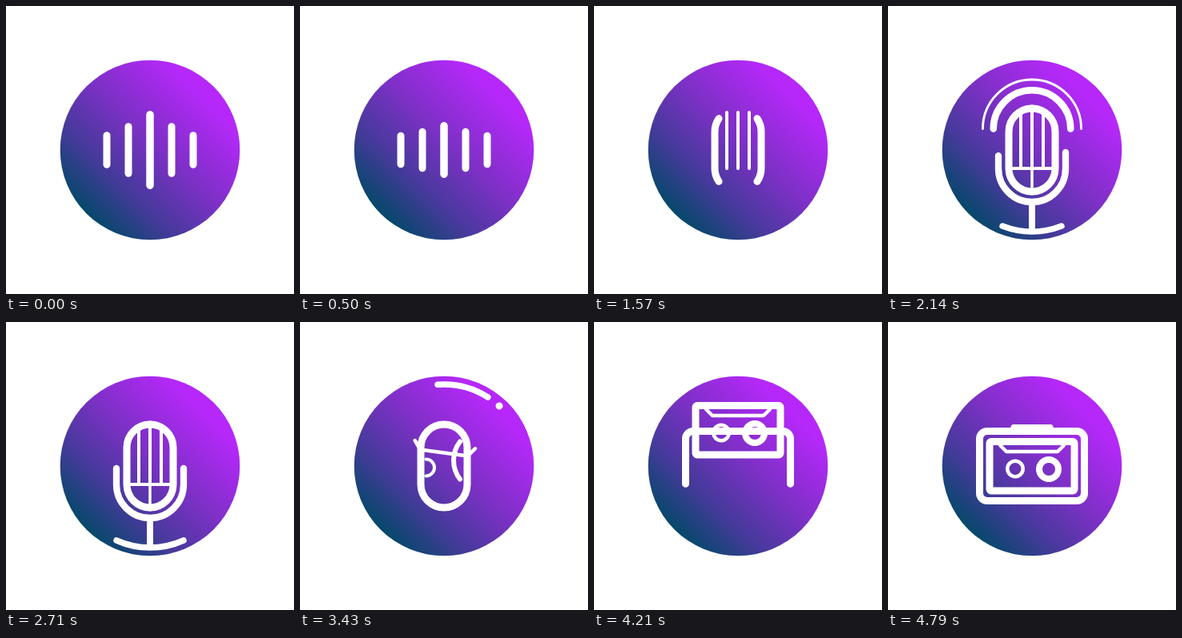
An HTML page with a canvas for the animation above (5000 ms loop, 360 by 360 pixels).

```html
<!DOCTYPE html>
<html lang="en">
<head>
<meta charset="utf-8">
<title>Sound icons</title>
<style>
  html, body { margin: 0; width: 100%; height: 100%; overflow: hidden; background: #fff; }
  canvas { display: block; width: 360px; height: 360px; }
</style>
</head>
<body>
<canvas id="stage"></canvas>
<script>
const LOOP = 5000, FPS = 14, LAST = 67;
const { PI } = Math;
const canvas = document.getElementById('stage');
const ctx = canvas.getContext('2d');
const ratio = window.devicePixelRatio || 1;
canvas.width = canvas.height = 360 * ratio;

const rad = deg => deg * PI / 180;
const mix = (a, b, p) => a + (b - a) * p;
const smooth = p => p * p * (3 - 2 * p);
const ramp = (t, a, b) => smooth(Math.min(1, Math.max(0, (t - a) / (b - a))));

// Eased value through [time, value] pairs
function track(t, ...keys) {
  let value = keys[0][1];
  for (let i = 1; i < keys.length; i++) {
    value = mix(value, keys[i][1], ramp(t, keys[i - 1][0], keys[i][0]));
  }
  return value;
}

function stroke(width, draw) {
  if (width <= 0) return;
  ctx.lineWidth = width;
  ctx.beginPath();
  draw(ctx);
  ctx.stroke();
}

const line = (width, x1, y1, x2, y2) =>
  stroke(width, c => { c.moveTo(x1, y1); c.lineTo(x2, y2); });

// Strokes a shape and its mirror image about x = 0
function mirrored(width, draw) {
  for (const side of [1, -1]) {
    ctx.save();
    ctx.scale(side, 1);
    stroke(width, draw);
    ctx.restore();
  }
}

const pair = (width, x, top, low) =>
  mirrored(width, c => { c.moveTo(x, top); c.lineTo(x, low); });

// Limits what is drawn to the first part of a path
function trimmed(length, part, draw) {
  if (part <= 0) return;
  ctx.setLineDash(part < 1 ? [part * length, length * 2] : []);
  draw();
  ctx.setLineDash([]);
}

// A line of fixed length curled by an angle; a full turn closes the ring
function curl(width, x, y, length, angle, dir) {
  const r = length / Math.max(angle, 0.01);
  const mid = dir > 0 ? PI : 0;
  stroke(width, c => c.arc(x + dir * r, y, r, mid - angle / 2, mid + angle / 2));
}

const fill = ctx.createLinearGradient(101, 259, 259, 101);
fill.addColorStop(0, '#06486b');
fill.addColorStop(0.25, '#453a9a');
fill.addColorStop(0.55, '#7d30c6');
fill.addColorStop(0.92, '#b528f9');

function disc() {
  ctx.fillStyle = fill;
  ctx.beginPath();
  ctx.arc(180, 180, 112.3, 0, 2 * PI);
  ctx.fill();
}

// Equalizer beats that settle to even bars
function bars(t) {
  const fade = 1 - ramp(t, 700, 1000);
  const bar = (x, amp, lag) => {
    const half = 16.3 + fade * amp * (1 + Math.cos(2 * PI * t / 667 - lag)) / 2;
    pair(9, x, 180 - half, 180 + half);
  };
  bar(54, 12, 2.3);
  bar(27, 13, 0);
  bar(0, 28, 0);
}

function waves(t) {
  for (const start of [1700, 1950]) {
    const p = (t - start) / 500;
    if (p <= 0 || p >= 1) continue;
    const open = ramp(p, 0, 0.35) * PI / 2;
    const width = 8.5 * Math.min(1, (1 - p) * 3);
    stroke(width, c => c.arc(0, 153.5, 38 + 26.6 * p, -PI / 2 - open, -PI / 2 + open));
  }
}

// Five bars gather into the head; the cradle is drawn from right to left
function micBuild(t) {
  const move = ramp(t, 1140, 1560);
  const close = ramp(t, 1420, 1780) * PI / 2;
  const side = mix(54, 29, move);
  const top = mix(163.7, 157, move), low = mix(196.3, 203, move);
  mirrored(9, c => {
    if (close) c.arc(0, 157, 29, -close, 0);
    else c.moveTo(side, top);
    c.lineTo(side, low);
    if (close) c.arc(0, 203, 29, 0, close);
  });
  const slim = mix(9, 4, move), rise = mix(163.7, 133, move);
  pair(slim, mix(27, 14, move), rise, low);
  line(slim, 0, rise, 0, low);

  const cross = ramp(t, 1600, 1850);
  if (cross) {
    line(4, -27 * cross, 203, 27 * cross, 203);
    line(3.5, 0, 203, 0, 203 + 28 * cross);
  }
  trimmed(172, ramp(t, 1600, 2200), () => stroke(8.3, c => {
    c.moveTo(42, 183);
    c.arc(0, 203, 42, 0, PI);
    c.lineTo(-42, 183);
  }));
}

function foot(t) {
  const drop = track(t, [1820, 0], [2000, 33], [2860, 33], [3060, 0]);
  if (drop > 0) line(8, 0, 245, 0, 245 + drop);

  // The base slides round the disc and fades out as a short dash with a dot
  const half = track(t, [1900, 0], [2212, 24.3], [2860, 24.3], [3430, 18.5], [3720, 0]);
  const angle = track(t, [2860, 90], [3430, -76], [3720, -130]);
  if (half > 0) {
    stroke(7.5, c => c.arc(0, 180, 102, rad(angle - half), rad(angle + half)));
  }
  const size = track(t, [3000, 0], [3300, 9], [3430, 9], [3650, 0]);
  const gap = rad(angle + track(t, [2900, 18], [3430, 28.6]));
  if (size > 0) stroke(size, c => c.arc(0, 180, 102, gap, gap + 0.001));
}

// The cradle flattens into the tape window
function cradle(t) {
  const p = ramp(t, 2860, 3430), q = ramp(t, 3430, 3700);
  const a = mix(mix(42, 38, p), 40, q), b = mix(mix(42, 30, p), 32, q);
  const top = mix(mix(183, 153, p), 154, q), low = mix(mix(203, 163.5, p), 162, q);
  const sag = 56 * (1 - p);
  ctx.save();
  ctx.translate(0, low);
  ctx.rotate(rad(7.6 * p * (1 - q)));
  stroke(mix(8.3, 4.5, p), c => {
    c.moveTo(-a, top - low);
    c.lineTo(-b, 0);
    c.bezierCurveTo(-b, sag, b, sag, b, 0);
    c.lineTo(a, top - low);
  });
  ctx.restore();
}

// The outer grille lines curl up into the reels
function reels(t) {
  const k = (a, b, c) => track(t, [2860, a], [3430, b], [3750, c]);
  curl(k(4, 4, 4.5), k(-14, -12, -11.3), k(168, 182, 183.5), k(70, 33, 61), k(0, PI, 2 * PI), -1);
  curl(k(4, 6, 8), k(14, 12, 9), k(168, 173, 184), k(70, 50.5, 75.4), k(0, 1.31, 2 * PI), 1);
}

function grille(t) {
  const keep = 1 - ramp(t, 2860, 3200);
  if (!keep) return;
  line(4 * keep, 0, 203 - 70 * keep, 0, 203);
  line(4 * keep, -27 * keep, 203, 27 * keep, 203);
  line(3.5 * keep, 0, 203, 0, 203 + 28 * keep);
}

function body(t) {
  const p = ramp(t, 3430, 3850);
  const w = mix(29, 53, p), top = mix(128, 149.5, p), low = mix(232, 211, p);
  stroke(9, c => c.roundRect(-w, top, 2 * w, low - top, mix(29, 2, p)));
}

// Outer case, drawn from the middle of the top edge down both sides
function shell(t) {
  const part = track(t, [3900, 0], [4210, 0.605], [4450, 1]);
  trimmed(210, part, () => mirrored(9, c => {
    c.moveTo(0, 136.5);
    c.arcTo(65.5, 136.5, 65.5, 180, 9.5);
    c.arcTo(65.5, 223.5, 0, 223.5, 9.5);
    c.lineTo(0, 223.5);
  }));
  const tab = ramp(t, 4500, 4720);
  if (tab) line(7, -23 * tab, 136 - 4.5 * tab, 23 * tab, 136 - 4.5 * tab);
}

function draw(t) {
  ctx.setTransform(ratio, 0, 0, ratio, 0, 0);
  ctx.clearRect(0, 0, 360, 360);
  disc();
  ctx.strokeStyle = '#fff';
  ctx.lineCap = ctx.lineJoin = 'round';
  ctx.translate(180, 0);
  if (t < 1140) {
    bars(t);
    return;
  }
  foot(t);
  if (t < 2860) {
    micBuild(t);
    waves(t);
    return;
  }
  shell(t);
  ctx.translate(0, track(t, [3500, 0], [4000, -45], [4210, -45], [4520, 0]));
  grille(t);
  cradle(t);
  reels(t);
  body(t);
}

// Poses are held at 14 per second, on a 10 ms clock
function tick() {
  const now = Math.floor(performance.now() % LOOP / 10) * 10;
  const step = Math.min(LAST, Math.floor((now + 5) * FPS / 1000));
  draw(step * 1000 / FPS);
  requestAnimationFrame(tick);
}
tick();
</script>
</body>
</html>
```
